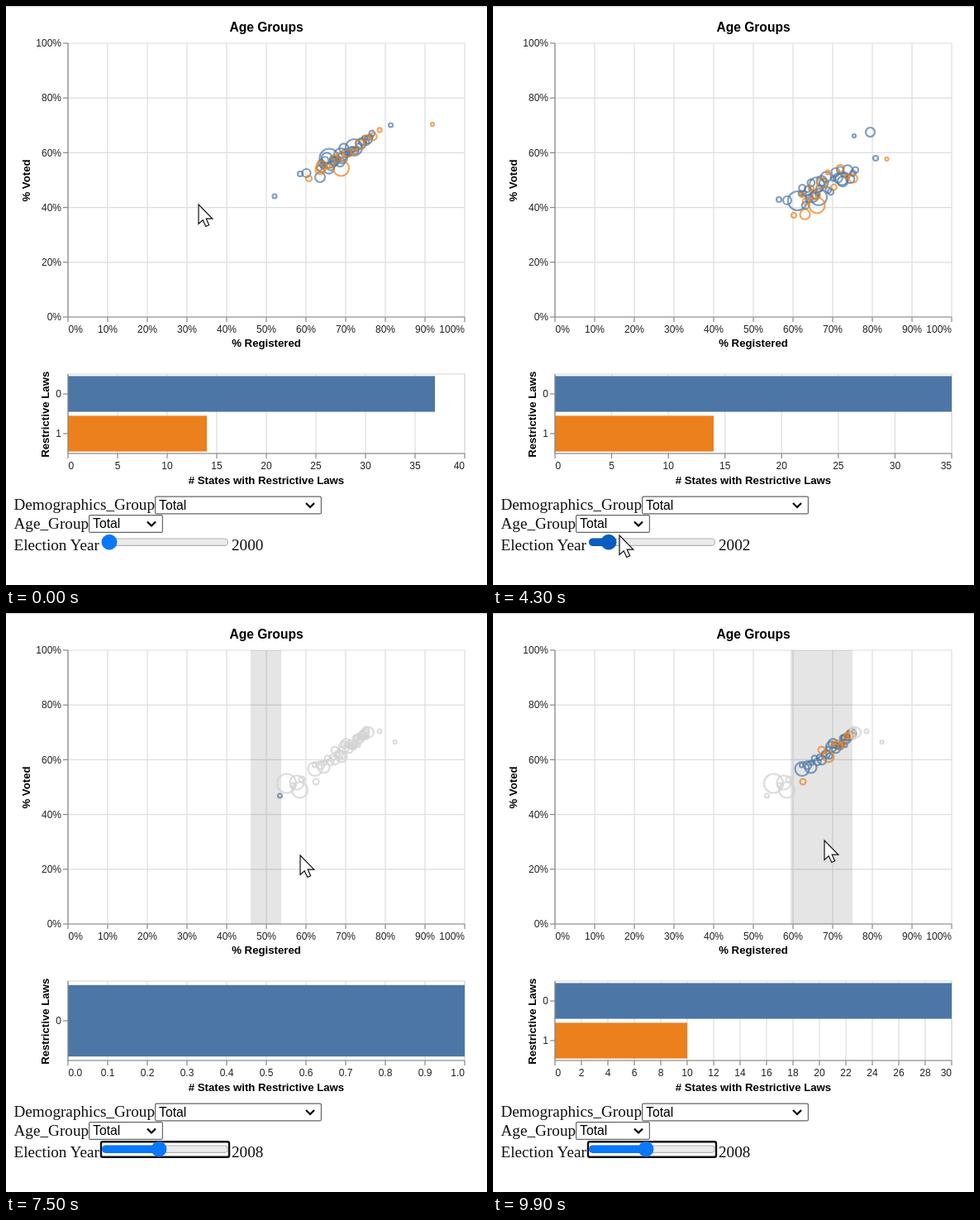
Recreate the animation shown at these times as an HTML page. Size 582 px wide and 700 px high, loop 10000 ms.

```html
<!DOCTYPE html>
<html lang="en">
<head>
<meta charset="utf-8">
<title>Age Groups</title>
<style>
  html, body { margin: 0; width: 100%; height: 100%; overflow: hidden; background: #fff; }
  svg { display: block; width: 100vw; height: 100vh; }
  text { font: 12px "Liberation Sans", Arial, sans-serif; fill: #222; }
  .head { font-size: 15.6px; font-weight: bold; fill: #000; }
  .name { font-size: 13.2px; font-weight: bold; fill: #000; }
  .form { font: 19.2px "Liberation Serif", "Times New Roman", serif; fill: #111; }
  .pick { font-size: 15.8px; fill: #000; }
</style>
</head>
<body>
<svg id="stage" viewBox="0 0 582 700" xmlns="http://www.w3.org/2000/svg"></svg>
<script>
const LOOP = 10000, STEP = 100;
const L = 75, R = 555, TOP = 45, BASE = 376, BAR_TOP = 445, BAR_BASE = 541;
const BLUE = '#4c76a5', ORANGE = '#eb801d', GRID = '#dddddd', AXIS = '#888888';

function seeded(seed) {
  return () => {
    seed = (seed * 16807) % 2147483647;
    return seed / 2147483647;
  };
}

// A few large or outlying circles, then a cloud along a rising trend
function cloud(color, keys, total, { from, to, bend, x0, y0, slope, noise, seed }) {
  const rand = seeded(seed);
  const out = keys.map(([x, y, r]) => ({ x, y, r, color }));
  const n = total - keys.length;
  for (let i = 0; i < n; i++) {
    const x = from + (to - from) * ((i + 0.5) / n) ** bend;
    const y = y0 - slope * (x - x0) + noise * (rand() + rand() - 1);
    out.push({ x, y, r: 2.5 + 4 * rand() ** 1.5, color });
  }
  return out;
}

const y2000 = { from: 378, to: 444, bend: 1, x0: 410, y0: 178, slope: 0.6, noise: 11, seed: 4021 };
const y2002 = { from: 372, to: 440, bend: 1.2, x0: 400, y0: 218, slope: 0.5, noise: 15, seed: 9173 };
const y2008 = { from: 364, to: 436, bend: 0.5, x0: 398, y0: 173, slope: 0.73, noise: 8, seed: 7717 };

const data = {
  2000: [
    ...cloud(BLUE, [[391, 184, 11.5], [421, 171, 10], [405, 180, 8], [380, 207, 6],
      [363.5, 202, 5], [356, 203, 3], [325, 230, 2.5], [465.5, 144, 2.5]], 37, y2000),
    ...cloud(ORANGE, [[405.5, 196, 9.5], [380, 198, 5.5], [366.5, 208.5, 3.5], [516, 143, 2]],
      14, { ...y2000, to: 456, seed: 311 })],
  2002: [
    ...cloud(BLUE, [[368.5, 235.5, 11.5], [394, 231, 10], [392, 216, 9], [422, 209, 7.5],
      [356, 235, 5], [346, 234, 3], [437, 157, 2], [456.5, 152.5, 5.5], [463, 184, 3]], 35, y2002),
    ...cloud(ORANGE, [[392, 241, 9.5], [377.5, 252, 6], [364, 253, 3], [476.5, 185, 2]],
      14, { ...y2002, seed: 523 })],
  2008: [
    ...cloud(BLUE, [[339.5, 206, 11.5], [352, 205, 8.5], [374, 188.5, 8.5], [384.5, 186.5, 7],
      [358, 201, 3.5], [347, 208.5, 3], [331.5, 221, 2.5], [452, 143, 2.5]], 37, y2008),
    ...cloud(ORANGE, [[355.5, 214, 9.5], [375, 204, 3.5], [470.5, 156, 2]],
      14, { ...y2008, from: 386, to: 440, seed: 137 })]
};
data[2004] = data[2000].map(d => ({ ...d, x: d.x + 8, y: 160 + (d.y - 176) * 1.3 }));
data[2006] = data[2002].map(d => ({ ...d, x: d.x + 2, y: d.y - 3 }));

// Moves are start time, end time, then the two values reached
const pointer = [
  [0, 400, 420, 178], [400, 1000, 185, 598], [1200, 1500, 325, 475], [1500, 1800, 189, 648],
  [1800, 2300, 130, 646], [2400, 3000, 146, 637], [3200, 4300, 153, 640], [4600, 5000, 186, 643],
  [5000, 5700, 310, 270], [5700, 6000, 303, 285], [6400, 6800, 318, 292], [6900, 7500, 356, 293],
  [7500, 8300, 374, 290], [8600, 9200, 377, 274], [9200, 9900, 401, 275]];
const band = [
  [6400, 6800, 296, 312], [6900, 7500, 296, 333], [7500, 8300, 296, 372],
  [8600, 9200, 310, 386], [9200, 9900, 360, 435]];
const yearSteps = [2600, 4400, 4700, 4900];

function along([x, y], moves, t) {
  for (const [t0, t1, x1, y1] of moves) {
    const p = Math.min(1, Math.max(0, (t - t0) / (t1 - t0)));
    x += (x1 - x) * p;
    y += (y1 - y) * p;
  }
  return [x, y];
}

const line = (x1, y1, x2, y2, c) =>
  `<path d="M${x1} ${y1}L${x2} ${y2}" stroke="${c}" stroke-width="1.2"/>`;
const rect = (x, y, w, h, rest) =>
  `<rect x="${x}" y="${y}" width="${w}" height="${h}" ${rest}/>`;
const label = (s, x, y, cls = '', anchor = 'start') =>
  `<text x="${x}" y="${y}" class="${cls}" text-anchor="${anchor}">${s}</text>`;
const upright = (s, x, y) =>
  `<text transform="translate(${x} ${y}) rotate(-90)" class="name" text-anchor="middle">${s}</text>`;
const flush = (s, i, n, x, y) =>
  i === 0 ? label(s, x + 0.5, y) : label(s, x, y, '', i === n ? 'end' : 'middle');
const inside = (d, brush) => !brush || (d.x >= brush[0] && d.x <= brush[1]);

function scatter(points, brush) {
  let s = label('Age Groups', 315, 30.5, 'head', 'middle');
  for (let i = 0; i <= 10; i++) {
    const x = L + 48 * i;
    s += line(x, TOP, x, BASE, GRID) + line(x, BASE, x, BASE + 6, AXIS);
    s += flush(i * 10 + '%', i, 10, x, 394.5);
  }
  for (let i = 0; i <= 5; i++) {
    const y = BASE - 66.2 * i;
    s += line(L, y, R, y, GRID) + line(L - 6, y, L, y, AXIS);
    s += label(i * 20 + '%', 67, y + 4.2, '', 'end');
  }
  if (brush) {
    s += rect(brush[0], TOP, brush[1] - brush[0], BASE - TOP, 'fill="#333" fill-opacity=".125"');
  }
  s += line(L, TOP, L, BASE, AXIS) + line(L, BASE, R, BASE, AXIS);
  for (const d of points) {
    const on = inside(d, brush);
    s += `<circle cx="${d.x}" cy="${d.y}" r="${d.r}" fill="none" stroke="${on ? d.color : '#d3d3d3'}"
      stroke-width="2.2" stroke-opacity="${on ? 0.7 : 0.8}"/>`;
  }
  return s + label('% Registered', 315, 412, 'name', 'middle') + upright('% Voted', 28.5, 211);
}

function tickStep(max) {
  const e = max / 10, p = 10 ** Math.floor(Math.log10(e)), r = e / p;
  return p * (r >= 7.07 ? 10 : r >= 3.162 ? 5 : r >= 1.414 ? 2 : 1);
}

function bars(points, brush) {
  const picked = points.filter(d => inside(d, brush));
  const rows = [BLUE, ORANGE]
    .map((color, id) => ({ id, color, count: picked.filter(d => d.color === color).length }))
    .filter(row => row.count);
  let s = rect(L, BAR_TOP, R - L, BAR_BASE - BAR_TOP, `fill="none" stroke="${GRID}" stroke-width="1.2"`);
  if (rows.length) {
    const max = Math.max(...rows.map(row => row.count));
    const step = tickStep(max), n = Math.ceil(max / step - 1e-9);
    for (let i = 0; i <= n; i++) {
      const x = L + (R - L) * i / n;
      s += line(x, BAR_TOP, x, BAR_BASE, GRID) + line(x, BAR_BASE, x, BAR_BASE + 6, AXIS);
      s += flush((i * step).toFixed(step < 1 ? 1 : 0), i, n, x, 560);
    }
    const h = (BAR_BASE - BAR_TOP) / rows.length;
    rows.forEach((row, i) => {
      const y = BAR_TOP + h * i, mid = y + h / 2;
      s += rect(L, y + h * 0.05, (R - L) * row.count / (n * step), h * 0.9, `fill="${row.color}"`);
      s += line(L - 6, mid, L, mid, AXIS) + label(row.id, 67, mid + 4.2, '', 'end');
    });
  } else {
    s += label('0', L + 0.5, 560);
  }
  s += line(L, BAR_TOP, L, BAR_BASE, AXIS) + line(L, BAR_BASE, R, BAR_BASE, AXIS);
  return s + label('# States with Restrictive Laws', 315, 578, 'name', 'middle') +
    upright('Restrictive Laws', rows.length ? 52.3 : 65, 493.8);
}

function picker(x, y, w) {
  const cx = x + w - 14, cy = y + 11;
  return rect(x + 0.6, y + 0.6, w - 1.2, 20.8, 'rx="1.5" fill="#fff" stroke="#666" stroke-width="1.2"') +
    label('Total', x + 5, y + 16.3, 'pick') +
    `<path d="M${cx - 5} ${cy - 2.5}l5 5 5 -5" fill="none" stroke="#000" stroke-width="2.2"/>`;
}

function form(year, t) {
  const x = 125 + 7.5 * (year - 2000);
  const held = t >= 2500 && t < 5000, focus = t >= 5000;
  const tint = held ? '#0a5cc0' : '#0a78fa';
  let s = label('Demographics_Group', 9.5, 609, 'form') + picker(180, 592.5, 202);
  s += label('Age_Group', 9.5, 632, 'form') + picker(100, 615, 90);
  s += label('Election Year', 9.5, 658, 'form') + label(year, 273, 658, 'form');
  if (focus) s += rect(115, 639.2, 155, 18.6, 'rx="2" fill="#fff" stroke="#101010" stroke-width="2.4"');
  s += rect(116.5, 644, 152, 8.4, 'rx="4.2" fill="#ececec" stroke="#b2b2b2" stroke-width="1.2"');
  s += rect(116, 643.5, x - 116, 9.4, `rx="4.6" fill="${tint}"`);
  return s + `<circle cx="${x}" cy="648.2" r="9.4" fill="${tint}"/>`;
}

const arrow = ([x, y]) => `<path transform="translate(${x} ${y})" fill="#fff" stroke="#111"
  stroke-width="1.2" d="M0 0V23.5L5.2 18.7 8.8 26.5 12.6 24.8 9.2 17.2H16.8Z"/>`;

const stage = document.getElementById('stage');
let last = -1;

function draw(t) {
  const year = 2000 + 2 * yearSteps.filter(s => t >= s).length;
  const brush = t > band[0][0] ? along([296, 296], band, t) : null;
  stage.innerHTML = rect(0, 0, 582, 700, 'fill="#fff"') + rect(0, 0, 582, 1.4, 'fill="#dcdcdc"') +
    scatter(data[year], brush) + bars(data[year], brush) + form(year, t) +
    arrow(along([233, 240], pointer, t));
}

const start = performance.now();
function tick() {
  const t = Math.floor((performance.now() - start) % LOOP / STEP) * STEP;
  if (t !== last) draw(last = t);
  requestAnimationFrame(tick);
}
tick();
</script>
</body>
</html>
```
